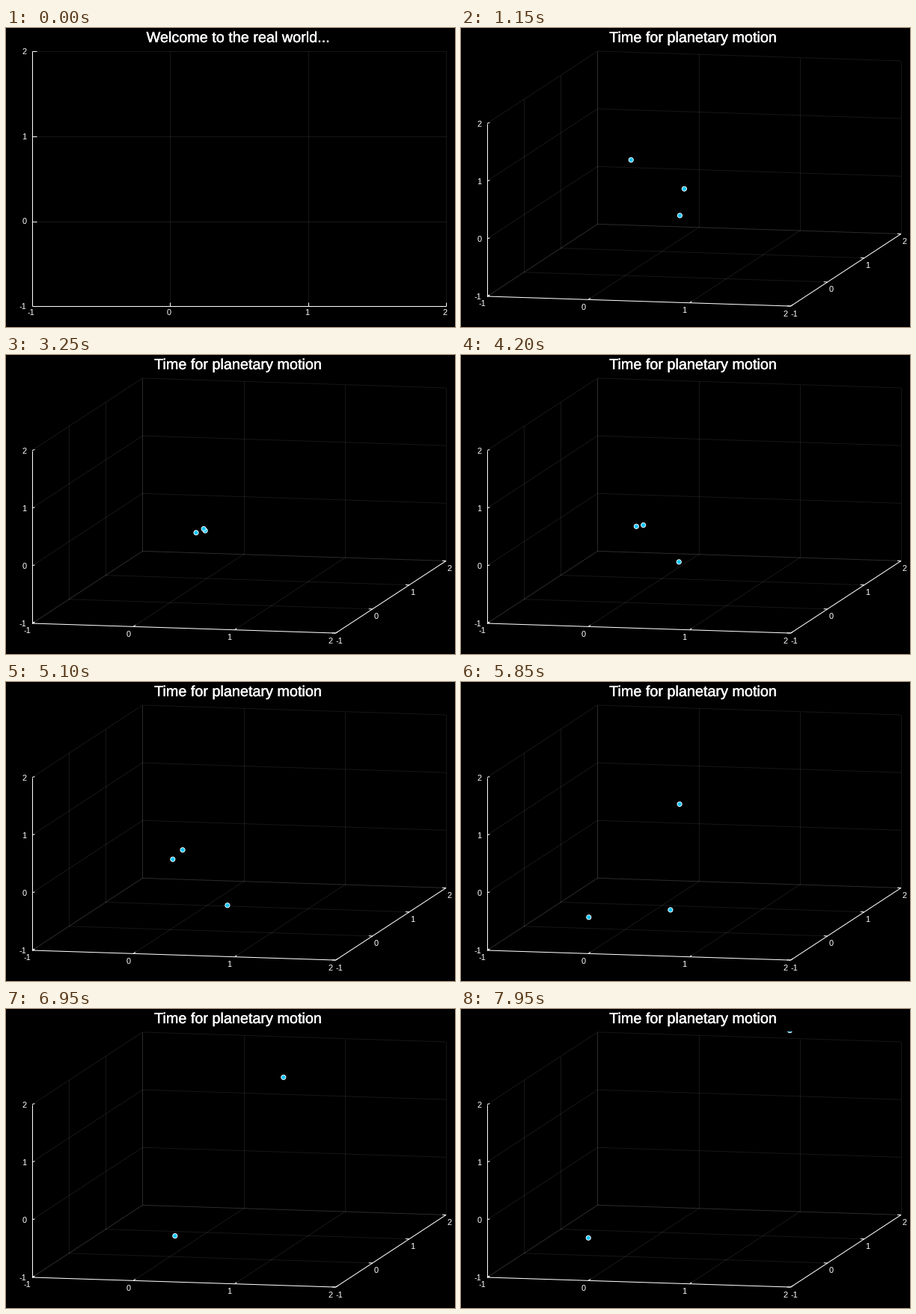
Write a matplotlib script that moves like this. It is 600 px wide and 400 px high and loops after 8 s.

```python
import numpy as np
import matplotlib.pyplot as plt
from matplotlib.animation import FuncAnimation
from matplotlib.patches import Circle, Rectangle
from matplotlib.patheffects import withStroke

W, H, DPI = 600, 400, 100
STEP, LOOP = 50, 8000
PX = 72 / DPI  # points per pixel
FONT = "Liberation Sans"
START, FLING = 1000, 5050  # motion begins; the close pair breaks up

fig = plt.figure(figsize=(W / DPI, H / DPI), dpi=DPI, facecolor="black")
ax = fig.add_axes([0, 0, 1, 1])
ax.set(xlim=(0, W), ylim=(H, 0))
ax.axis("off")


def line(p, q, color="white", z=2):
    return ax.plot([p[0], q[0]], [p[1], q[1]], color=color, lw=PX, zorder=z,
                   solid_capstyle="butt")[0]


def grid(p, q):
    return line(p, q, (1, 1, 1, 0.09), 1)


def label(x, y, value, ha="center"):
    return ax.text(x, y, str(value), color="white", fontname=FONT,
                   fontsize=11 * PX, ha=ha, va="center")


def flat_axes():
    left, right, top, bottom = 35, 588, 31, 372.4
    parts = []
    for i in range(4):
        x = left + (right - left) * i / 3
        y = bottom + (top - bottom) * i / 3
        if i:
            parts += [grid((x, top), (x, bottom)), grid((left, y), (right, y)),
                      line((x, bottom), (x, bottom - 5)),
                      line((left, y), (left + 6, y))]
        parts += [label(x - 1.2, 381, i - 1),
                  label(27.7, y + 0.8, i - 1, "right")]
    parts += [line((left, top), (left, bottom)),
              line((left, bottom), (right, bottom))]
    return parts


def project(x, y, z):
    """Map data in [-1, 2]^3 to stage pixels."""
    return (35 + 135.2 * (x + 1) + 49.15 * (y + 1),
            359 + 4.35 * (x + 1) - 32.2 * (y + 1) - 77.15 * (z + 1))


def box_axes():
    lo, hi = -1, 2
    parts = []
    for v in range(lo, hi + 1):
        for p, q in (((v, lo, lo), (v, hi, lo)), ((lo, v, lo), (hi, v, lo)),
                     ((lo, v, lo), (lo, v, hi)), ((lo, lo, v), (lo, hi, v)),
                     ((v, hi, lo), (v, hi, hi)), ((lo, hi, v), (hi, hi, v))):
            parts.append(grid(project(*p), project(*q)))
        px, py = project(v, lo, lo)
        parts += [line((px, py), (px + 3, py - 2)), label(px - 6.8, py + 10.5, v)]
        px, py = project(hi, v, lo)
        parts += [line((px, py), (px - 5, py - 0.2)), label(px + 4.7, py + 10.5, v)]
        px, py = project(lo, lo, v)
        parts += [line((px, py), (px + 3.5, py - 1)),
                  label(27.7, py + 1.3, v, "right")]
    corners = [project(*c) for c in ((lo, lo, hi), (lo, lo, lo),
                                     (hi, lo, lo), (hi, hi, lo))]
    parts += [line(p, q) for p, q in zip(corners, corners[1:])]
    return parts


# Evenly timed waypoints of the lone body.
SPAN = 1150
WAY = np.array([(227.6, 175), (235.3, 195.5), (267.5, 237), (294.8, 285.5),
                (288, 303.8), (236, 303.3), (173.2, 306)])
SLOPE = np.gradient(WAY, axis=0, edge_order=2)


def lone(t):
    """Smooth cubic path through the waypoints."""
    u = (t - START) / SPAN
    i = min(int(u), len(WAY) - 2)
    s = u - i
    return ((1 + 2 * s) * (1 - s) ** 2 * WAY[i] + s * (1 - s) ** 2 * SLOPE[i]
            + s * s * (3 - 2 * s) * WAY[i + 1] + s * s * (s - 1) * SLOPE[i + 1])


def pair_gap(t):
    """The pair swings with a shrinking gap, then flies apart and slows."""
    if t >= FLING:
        s = (t - FLING) / 1000
        return np.array([145 * s ** 0.8, -185 * s ** 0.9])
    s = (t - START) / 1000
    u = s + 0.07
    fade = 1 - ((t - START) / (FLING - START)) ** 5
    return np.array([22.5 * fade * np.sin(1.186 * u + 0.1644 * u * u),
                     -49 * fade ** 9 * np.sin(0.638 + 1.19 * s)])


def bodies(t):
    """Equal masses: the sum of the positions drifts in a straight line."""
    total = np.array([818, 642.5]) + np.array([-0.016, 0.0299]) * (t - 1150)
    a, gap = lone(t), pair_gap(t)
    rest = total - a
    return a, (rest + gap) / 2, (rest - gap) / 2


flat, box = flat_axes(), box_axes()
title = ax.text(310, 19, "", color="white", fontname=FONT, fontsize=19.8 * PX,
                ha="center", va="baseline")
title.set_path_effects([withStroke(linewidth=0.35 * PX, foreground="white")])
frame = Rectangle((35, 30), 553.5, 342, transform=ax.transData)
dots = [ax.add_patch(Circle((0, 0), 3.1, fc="#12c6fc", ec="white",
                            lw=0.9 * PX, zorder=5)) for _ in range(3)]
for dot in dots:
    dot.set_clip_path(frame)


def update(i):
    t = i * STEP
    solid = t >= START
    for part in flat:
        part.set_visible(not solid)
    for part in box + dots:
        part.set_visible(solid)
    if solid:
        title.set_text("Time for planetary motion")
        for dot, pos in zip(dots, bodies(t)):
            dot.center = pos
    elif t >= 500:
        title.set_text("Time for a new dimension...")
    else:
        title.set_text("Welcome to the real world...")
    return [*flat, *box, *dots, title]


anim = FuncAnimation(fig, update, frames=LOOP // STEP, interval=STEP,
                     repeat=True, repeat_delay=0, blit=False)
plt.show()
```
